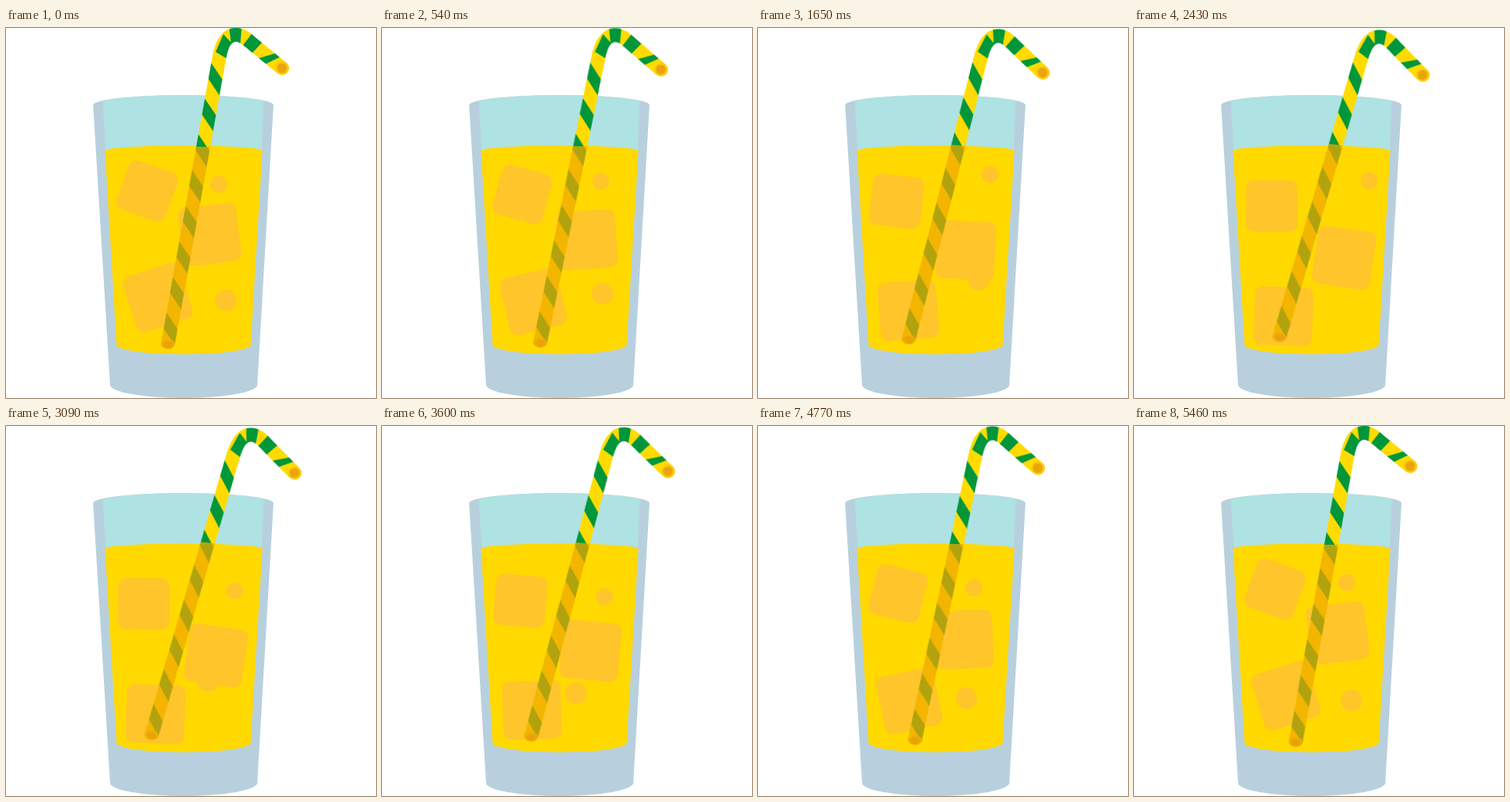
Animation of 480 by 480 pixels, one loop 5.55 s. Source, as an HTML page:

```html
<!DOCTYPE html>
<html lang="en">
<head>
<meta charset="utf-8">
<title>Cold drink</title>
<style>
  html, body { margin: 0; width: 100%; height: 100%; overflow: hidden; background: #fff; }
  svg { display: block; width: 100vw; height: 100vh; }

  .sway, .bubble { animation: sway 5550ms linear infinite; }
  .straw { --a: rotate(0deg); --b: rotate(7deg); transform-origin: 284px 208px; }
  .top { --a: translate(183px, 211.5px) rotate(20deg); --b: translate(178px, 233.5px) rotate(-2deg); }
  .middle { --a: translate(264.3px, 268px) rotate(-7deg); --b: translate(273.5px, 302px) rotate(10.5deg); }
  .bottom { --a: translate(197px, 349.5px) rotate(-18deg); --b: translate(193.7px, 377px) rotate(5deg); }
  .small { animation-name: small; }
  .large { animation-name: large; }

  @keyframes sway {
    0%, 99%, 100% { transform: var(--a); }
    49.5% { transform: var(--b); }
  }
  @keyframes small {
    0%, 98.38%, 100% { transform: translate(276px, 203px); }
    19.46% { transform: translate(292px, 195px); }
    36.5% { transform: translate(307px, 187px); }
    43.78% { transform: translate(305px, 198px); }
    55.68% { transform: translate(296.5px, 214px); }
    64% { transform: translate(289px, 222px); }
    74.05% { transform: translate(284px, 216px); }
  }
  @keyframes large {
    0% { transform: translate(285px, 353px); }
    19.46% { transform: translate(287px, 336px); }
    36% { transform: translate(286px, 321px); }
    43.78% { transform: translate(279px, 318px); }
    55.68% { transform: translate(262px, 331px); }
    64% { transform: translate(251px, 346px); }
    74.05% { transform: translate(259.5px, 350px); }
    98.38%, 99.99% { transform: translate(282px, 356px); }
    100% { transform: translate(285px, 353px); }
  }
</style>
</head>
<body>
<svg viewBox="0 0 480 480">
  <defs>
    <path id="tube" d="M210 410 L276.5 39 C279.5 22 285 9 298 8.8 C306 8.7 312 14 320 20.8 L358 52"
          fill="none" stroke-width="18"/>
    <mask id="tubeMask" maskUnits="userSpaceOnUse" x="180" y="-20" width="220" height="460">
      <use href="#tube" stroke="#fff"/>
      <ellipse cx="210" cy="410" rx="9" ry="6.5" fill="#fff"/>
    </mask>
  </defs>

  <!-- glass -->
  <path fill="#b8d0dd" d="M113 100 A117 13 0 0 1 347 100 L326 463 A95.5 17 0 0 1 135 463 Z"/>
  <path fill="#afe2e2" d="M125.5 94.5 A117 13 0 0 1 334.5 94.5 L331 175 H130 Z"/>
  <path fill="#ffd900" d="M128.5 159.2 A102 6.7 0 0 1 332.5 159.2 L317.5 411 A87 12.2 0 0 1 143.5 411 Z"/>

  <!-- ice and bubbles -->
  <g fill="#ffc52b">
    <rect class="sway top" x="-33.5" y="-33.5" width="67" height="67" rx="11"/>
    <rect class="sway middle" x="-38" y="-38" width="76" height="76" rx="10"/>
    <rect class="sway bottom" x="-38" y="-38" width="76" height="76" rx="10"/>
    <circle class="bubble small" r="11"/>
    <circle class="bubble large" r="14"/>
  </g>

  <!-- straw -->
  <g class="sway straw">
    <g mask="url(#tubeMask)">
      <rect x="180" y="-20" width="220" height="460" fill="#ffdb00"/>
      <g fill="#009639">
        <path transform="translate(210 410) rotate(10.17) skewY(46)" d="M0 -9.5 V-364"
              fill="none" stroke="#009639" stroke-width="20" stroke-dasharray="21 26"/>
        <path d="M272 31 L282 8 L295 22 L287 40 Z"/>
        <path d="M289 -4 H306 L304 20 H292 Z"/>
        <path d="M319 7 L333 18 L318 34 L307 23 Z"/>
        <path d="M322 41 L352 32 L361 35 L334 48 Z"/>
      </g>
      <rect x="180" y="154" width="110" height="270" fill="#efa800" opacity=".745"/>
    </g>
    <ellipse cx="210" cy="410" rx="8.8" ry="6.3" fill="#f0b000"/>
    <ellipse cx="210.5" cy="410.5" rx="6.3" ry="4.5" fill="#eaa20a"/>
    <circle cx="358.3" cy="52" r="9" fill="#fbcc08"/>
    <circle cx="358" cy="52" r="6.3" fill="#eba50c"/>
  </g>
</svg>
</body>
</html>
```
